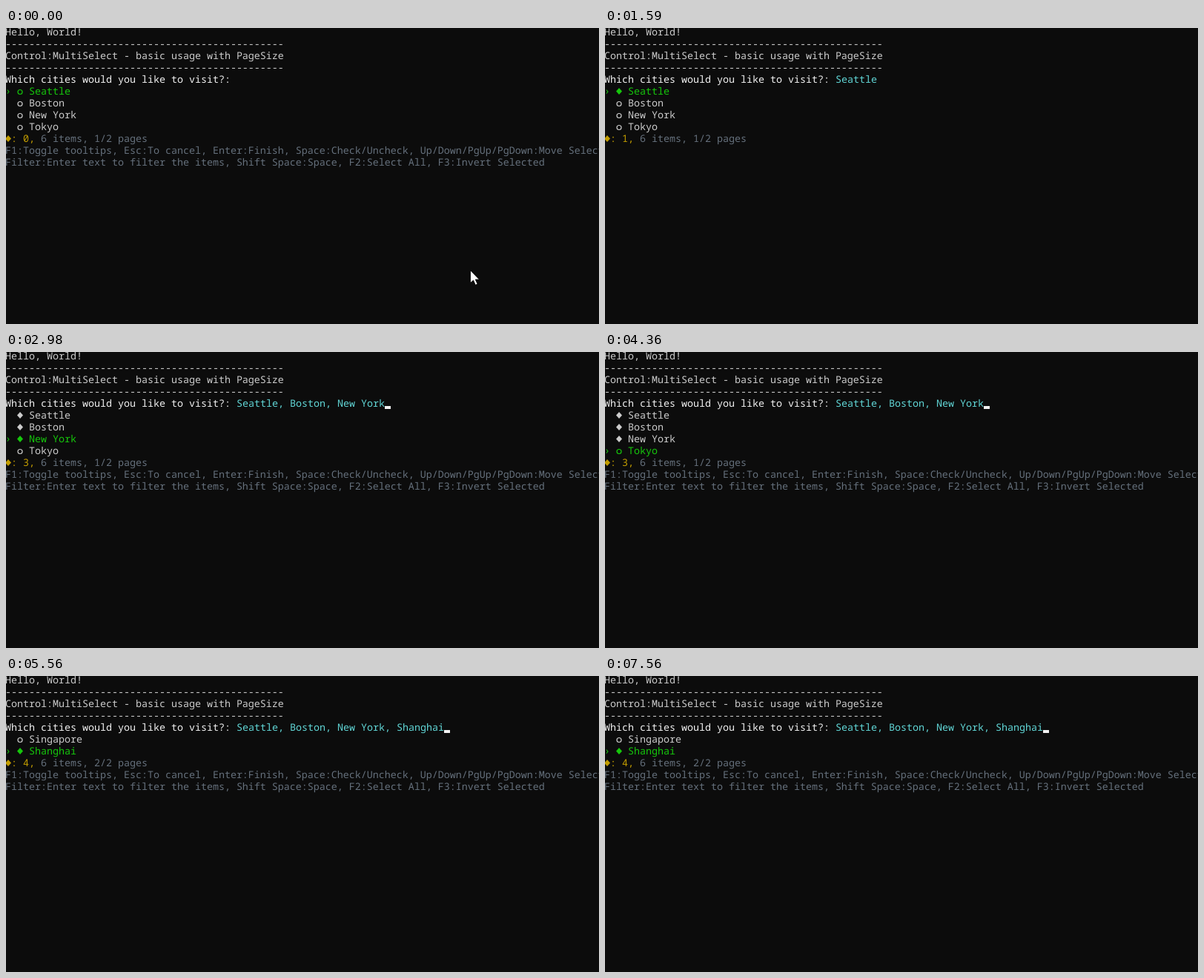
These frames come from a looping animation (800x400 px, 8000 ms). An HTML page:

```html
<!DOCTYPE html>
<html lang="en">
<head>
<meta charset="utf-8">
<title>Multi-select prompt</title>
<style>
html, body { margin: 0; width: 100%; height: 100%; overflow: hidden; background: #0c0c0c; }
svg { display: block; width: 100%; height: 100%; }
text {
  font: 13.3333px "Noto Sans Mono", "DejaVu Sans Mono", monospace;
  font-variant-ligatures: none;
  white-space: pre;
  text-rendering: geometricPrecision;
}
</style>
</head>
<body>
<svg id="stage" viewBox="0 0 800 400"></svg>
<script>
const LOOP = 8000, COL = 8, ROW = 16, LEFT = -1;
const C = {
  text: '#cccccc', bright: '#f2f2f2', green: '#16c60c',
  cyan: '#61d6d6', yellow: '#c19c00', gray: '#65707c'
};
const QUESTION = 'Which cities would you like to visit?: ';
const PAGES = [['Seattle', 'Boston', 'New York', 'Tokyo'], ['Singapore', 'Shanghai']];
const RULE = '-'.repeat(47);
const TIPS = [
  'F1:Toggle tooltips, Esc:To cancel, Enter:Finish, Space:Check/Uncheck, Up/Down/PgUp/PgDown:Move Select',
  'Filter:Enter text to filter the items, Shift Space:Space, F2:Select All, F3:Invert Selected'
];

// Each step overrides part of the state from its time on.
const STEPS = [
  [0, { page: 0, focus: 0, picked: [], tips: true, caret: false, mouse: true }],
  [200, { mouse: false }],
  [790, { caret: true }],
  [1390, { caret: false }],
  [1590, { picked: ['Seattle'], tips: false }],
  [1790, { tips: true, caret: true }],
  [1990, { focus: 1 }],
  [2380, { picked: ['Seattle', 'Boston'] }],
  [2580, { focus: 2 }],
  [2980, { picked: ['Seattle', 'Boston', 'New York'] }],
  [3370, { caret: false }],
  [3970, { caret: true }],
  [4170, { focus: 3 }],
  [4560, { page: 1, focus: 0 }],
  [4960, { focus: 1 }],
  [5360, { picked: ['Seattle', 'Boston', 'New York', 'Shanghai'] }],
  [6170, { caret: false }],
  [6560, { caret: true }],
  [7160, { caret: false }],
  [7560, { caret: true }]
];

const stage = document.getElementById('stage');
const x = col => LEFT + col * COL;
const print = (row, col, str, fill) =>
  `<text x="${x(col)}" y="${row * ROW + 10}" fill="${fill}">${str}</text>`;
const diamond = (row, col, fill) =>
  `<path d="M${x(col) + 4} ${row * ROW + 1}l4 4.5l-4 4.5l-4-4.5z" fill="${fill}"/>`;
const ring = (row, col, stroke) =>
  `<circle cx="${x(col) + 4}" cy="${row * ROW + 6.5}" r="3" fill="none" stroke="${stroke}" stroke-width="1.2"/>`;

function draw(s) {
  const answer = s.picked.join(', ');
  const items = PAGES[s.page];
  let out = print(0, 0, 'Hello, World!', C.text)
    + print(1, 0, RULE, C.text)
    + print(2, 0, 'Control:MultiSelect - basic usage with PageSize', C.text)
    + print(3, 0, RULE, C.text)
    + print(4, 0, QUESTION, C.bright)
    + print(4, QUESTION.length, answer, C.cyan);

  items.forEach((name, i) => {
    const row = 5 + i, color = i === s.focus ? C.green : C.text;
    if (i === s.focus) out += print(row, 0, '›', color);
    out += (s.picked.includes(name) ? diamond : ring)(row, 2, color);
    out += print(row, 4, name, color);
  });

  const foot = 5 + items.length;
  out += diamond(foot, 0, C.yellow)
    + print(foot, 1, `: ${s.picked.length},`, C.yellow)
    + print(foot, 6, `6 items, ${s.page + 1}/2 pages`, C.gray);
  if (s.tips) TIPS.forEach((tip, i) => { out += print(foot + 1 + i, 0, tip, C.gray); });

  if (s.caret) {
    const col = QUESTION.length + answer.length;
    out += `<rect x="${x(col)}" y="73" width="8" height="4" fill="${C.bright}"/>`;
  }
  if (s.mouse) {
    out += '<path d="M626.5 327.5v17l4-3.6 2.8 6.4 2.8-1.2-2.8-6.2h5.2z" fill="#fff" stroke="#000" stroke-width=".8"/>';
  }
  stage.innerHTML = out;
}

let shown = -1;
function update(now) {
  const t = now % LOOP;
  const step = STEPS.filter(([at]) => at <= t).length - 1;
  if (step !== shown) {
    shown = step;
    draw(Object.assign({}, ...STEPS.slice(0, step + 1).map(([, change]) => change)));
  }
}

let start;
function tick(now) {
  start ??= now;
  update(Math.max(0, now - start));
  requestAnimationFrame(tick);
}
update(0);
requestAnimationFrame(tick);
</script>
</body>
</html>
```
